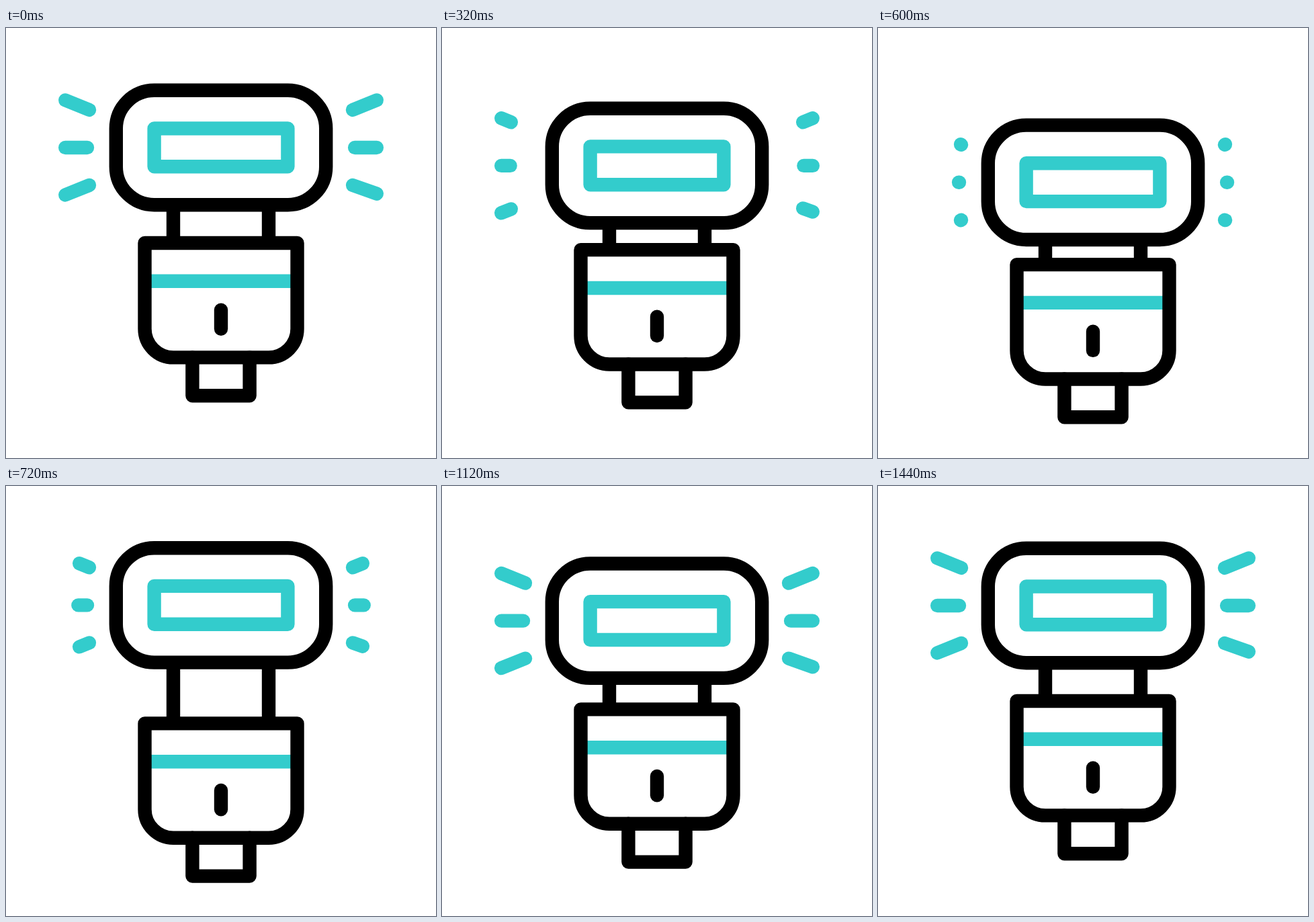
An HTML page with a canvas that plays this animation: 640x640 px, repeating every 1.56 s.

```html
<!DOCTYPE html>
<html lang="en">
<head>
<meta charset="utf-8">
<title>Camera flash</title>
<style>
  html, body { margin: 0; width: 100%; height: 100%; overflow: hidden; background: #fff; }
  canvas { display: block; width: 640px; height: 640px; }
</style>
</head>
<body>
<canvas id="stage" width="640" height="640"></canvas>
<script>
const ctx = document.getElementById('stage').getContext('2d');
const BLACK = '#000', TEAL = '#33cccc';
const STEP = 40, LOOP = 1560;
const INFLUENCE = 0.58;

// Keys are [step, value]; positions are offsets in pixels from rest.
const BODY_KEYS = [[1, 0], [18, 33.4], [36, 0]];
const HEAD_KEYS = [[1, 0], [13.5, 26.3], [19, -36.6], [27, 10.4], [36, 0]]; // relative to body
const RAY_START_KEYS = [[4.5, 0], [11, 1]];
const RAY_END_KEYS = [[13.5, 0], [23.2, 1]];

// Outer and inner end of each ray.
const RAYS = [
  [88.2, 107.4, 124, 121.9],
  [88.2, 178, 121, 178],
  [88.2, 248.4, 124, 234],
  [551.8, 107.4, 516, 121.9],
  [551.8, 178, 519.1, 178],
  [551.8, 246.7, 516, 234]
];

// Symmetric cubic ease, solved by bisection.
function ease(u) {
  let lo = 0, hi = 1;
  for (let i = 0; i < 24; i++) {
    const p = (lo + hi) / 2, q = 1 - p;
    const x = 3 * q * q * p * INFLUENCE + 3 * q * p * p * (1 - INFLUENCE) + p * p * p;
    if (x < u) lo = p; else hi = p;
  }
  return lo * lo * (3 - 2 * lo);
}

function valueAt(keys, step) {
  if (step <= keys[0][0]) return keys[0][1];
  for (let i = 1; i < keys.length; i++) {
    const [t0, v0] = keys[i - 1], [t1, v1] = keys[i];
    if (step < t1) return v0 + (v1 - v0) * ease((step - t0) / (t1 - t0));
  }
  return keys[keys.length - 1][1];
}

function stroke(color, trace, cap = 'round') {
  ctx.strokeStyle = color;
  ctx.lineCap = cap;
  ctx.beginPath();
  trace();
  ctx.stroke();
}

function line(color, x0, y0, x1, y1, cap) {
  stroke(color, () => {
    ctx.moveTo(x0, y0);
    ctx.lineTo(x1, y1);
  }, cap);
}

function drawRays(step, dy) {
  // Rays shrink outwards, then grow again from the inner end.
  const hiding = step < 12;
  const from = hiding ? valueAt(RAY_START_KEYS, step) : 0;
  const to = hiding ? 1 : valueAt(RAY_END_KEYS, step);
  if (to - from < 0.001) return;
  for (const [ox, oy, ix, iy] of RAYS) {
    const x = p => ix + (ox - ix) * p;
    const y = p => iy + (oy - iy) * p + dy;
    line(TEAL, x(from), y(from), x(to), y(to));
  }
}

function drawHead(dy) {
  stroke(TEAL, () => ctx.rect(220.6, 149.5 + dy, 198.8, 56.8));
  stroke(BLACK, () => ctx.roundRect(163.8, 92.8 + dy, 312.4, 170.4, 56.8));
}

function drawBody(dy) {
  line(TEAL, 210, 376.8 + dy, 430, 376.8 + dy, 'butt');
  line(BLACK, 320, 419.6 + dy, 320, 447.8 + dy);
  stroke(BLACK, () => ctx.roundRect(206.5, 320 + dy, 227, 170.4, [0, 0, 42.6, 42.6]));
  stroke(BLACK, () => {
    ctx.moveTo(277.4, 490.4 + dy);
    ctx.lineTo(277.4, 547.2 + dy);
    ctx.lineTo(362.6, 547.2 + dy);
    ctx.lineTo(362.6, 490.4 + dy);
  });
}

function draw(time) {
  const step = Math.floor((time % LOOP) / STEP);
  const bodyY = valueAt(BODY_KEYS, step);
  const headY = bodyY + valueAt(HEAD_KEYS, step);

  ctx.fillStyle = '#fff';
  ctx.fillRect(0, 0, 640, 640);
  ctx.lineWidth = 20.4;
  ctx.lineJoin = 'round';

  drawRays(step, headY);
  for (const x of [249, 391]) line(BLACK, x, 263.2 + headY, x, 320 + bodyY, 'butt');
  drawHead(headY);
  drawBody(bodyY);
}

let start = null;
function tick(now) {
  if (start === null) start = now;
  draw(now - start);
  requestAnimationFrame(tick);
}
draw(0);
requestAnimationFrame(tick);
</script>
</body>
</html>
```
